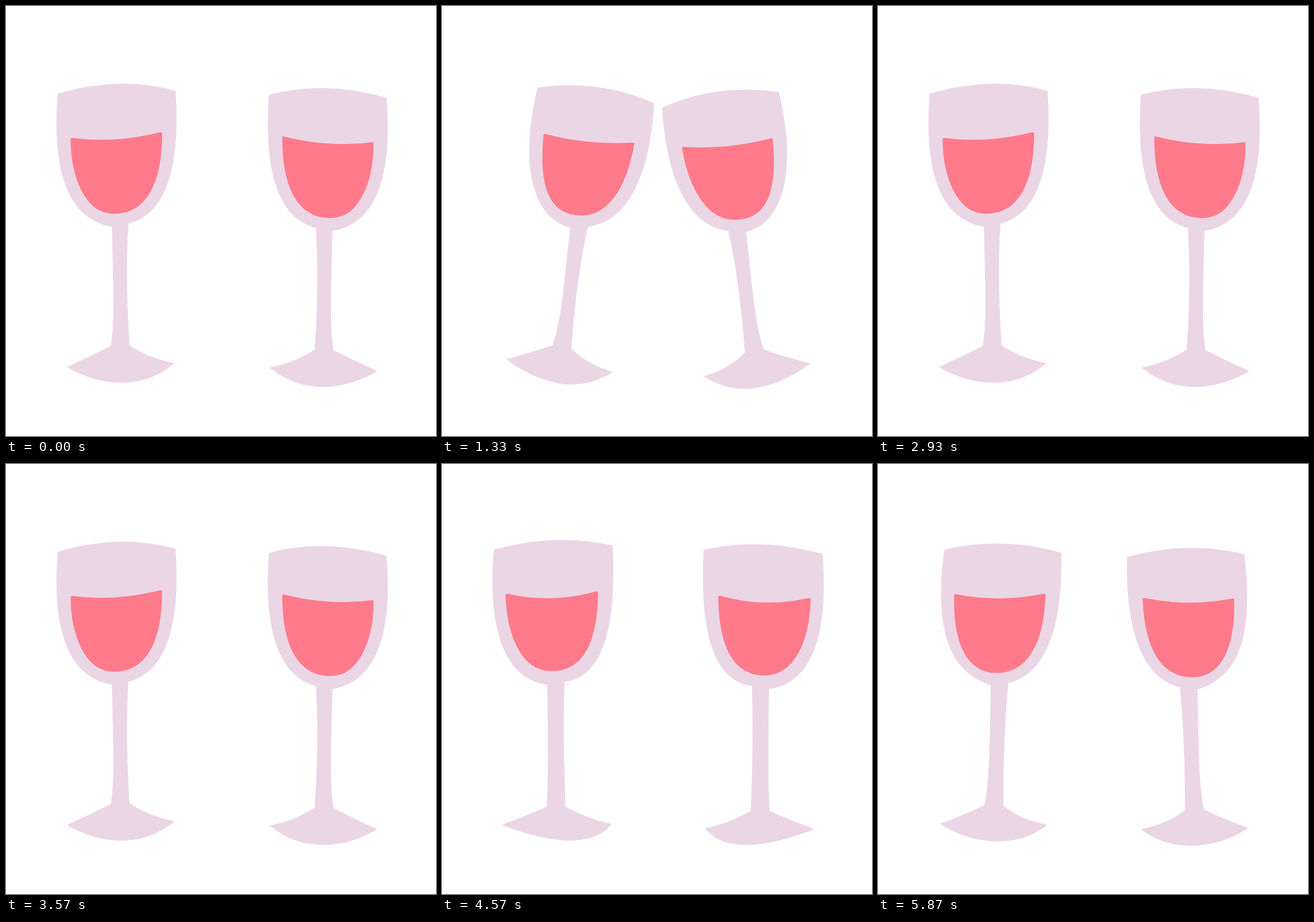
Recreate the animation shown at these times as an HTML page. Size 748 px wide and 748 px high, loop 5.91 s.

```html
<!DOCTYPE html>
<html lang="en">
<head>
<meta charset="utf-8">
<title>Cheers</title>
<style>
  html, body { margin: 0; width: 100%; height: 100%; overflow: hidden; background: #fff; }
  svg { display: block; width: 100vw; height: 100vh; }
  #glass { fill: #ebd6e6; stroke: #ebd6e6; stroke-width: 2; stroke-linejoin: round; }
  #wine { fill: #ff7b8b; stroke: #ff7b8b; stroke-width: 5; stroke-linejoin: round; }
  #spark { fill: none; stroke: #ff7b8b; stroke-width: 6; stroke-linecap: round; }
</style>
</head>
<body>
<svg viewBox="0 0 748 748">
  <defs>
    <g id="left"><path id="glass"/><path id="wine"/></g>
  </defs>
  <use href="#left"/>
  <use href="#left" transform="translate(752 7.5) scale(-1 1)"/>
  <path id="spark" d="M330.500 98.500Q340 119 355.500 137M384 85.500Q378.500 103 378.500 123M427 108.500Q415 126 400.500 139.500"/>
</svg>
<script>
const LOOP = 5910;
const $ = id => document.getElementById(id);

// Left glass in each drawn pose; the right glass is its mirror image.
const poses = {
  upright: {
    glass: 'M91 150Q200 120 296 143C302 270 285 369 212 378Q209 480 214 597Q255 619 293 627C262 663 200 663 107 628Q150 611 183 597C187 540 185 450 184 383C110 374 80 290 91 150Z',
    wine: 'M113 228Q190 246 269 224C268 310 243 358 191 358C136 358 115 290 113 228Z'
  },
  outward: {
    glass: 'M91 153Q198 122 294 148C302 270 283 360 212 378Q206 470 214 591Q250 614 291 622C240 664 170 664 108 628Q150 609 183 592C190 560 188 480 185 383C110 371 80 290 91 153Z',
    wine: 'M115 232Q190 242 269 222C269 310 241 359 188 359C136 359 115 290 115 232Z'
  },
  leaning: {
    glass: 'M116 150Q212 126 318 155C320 260 301 363 226 380Q217 470 217 595Q250 621 293 628C245 665 170 665 110 626Q150 612 186 594C195 555 196 470 197 384C115 359 101 270 116 150Z',
    wine: 'M135 229Q212 244 289 228C286 310 259 361 206 361C151 361 133 300 135 229Z'
  },
  tilted: {
    glass: 'M167 143Q275 128 368 170C361 290 324 375 253 383Q234 465 224 596Q251 624 295 637C243 669 185 665 113 615Q155 604 193 591C210 545 214 470 224 385C146 364 141 250 167 143Z',
    wine: 'M179 225Q255 245 332 240C318 320 284 362 243 362C186 362 171 310 179 225Z'
  }
};

const halfway = (a, b) => {
  const other = b.match(/\d+/g);
  let i = 0;
  return a.replace(/\d+/g, n => (+n + +other[i++]) / 2);
};
poses.closing = {
  glass: halfway(poses.leaning.glass, poses.tilted.glass),
  wine: halfway(poses.leaning.wine, poses.tilted.wine)
};

const states = {
  A: { pose: 'upright' },
  B: { pose: 'outward' },
  C: { pose: 'leaning' },
  E: { pose: 'closing' },
  D: { pose: 'tilted' },
  S: { pose: 'tilted', spark: true },
  T: { pose: 'tilted', spark: true, turn: 'translate(0 2) rotate(1 204 610)' }
};

// Start time in ms and state: A/B wobble, then C E S T D E C for each clink.
const timeline = `
  0B 130A 270B 400A 500B 600A 730B 870A
  1000C 1030E 1070S 1200T 1330D 1370E 1400C
  1470B 1600A 1730B 1870A 2000B 2100A 2200B 2330A
  2500C 2530E 2570S 2700T 2800D 2830E 2870C
  2930B 3100A 3200B 3330A 3470B 3600A 3700B 3800A
  3970C 4000E 4070S 4170T 4300D 4330E 4370C
  4400B 4570A 4700B 4800A 4930B 5070A 5170B 5300A
  5470C 5500E 5530S 5670T 5800D 5830E 5870C
`.trim().split(/\s+/).map(step => ({ start: parseInt(step, 10), state: states[step.slice(-1)] }));

function draw(time) {
  const { state } = timeline.findLast(step => step.start <= time);
  const pose = poses[state.pose];
  $('glass').setAttribute('d', pose.glass);
  $('wine').setAttribute('d', pose.wine);
  $('left').setAttribute('transform', state.turn || '');
  $('spark').setAttribute('visibility', state.spark ? 'visible' : 'hidden');
}

const begin = performance.now();
function tick() {
  draw((performance.now() - begin) % LOOP);
  requestAnimationFrame(tick);
}
tick();
</script>
</body>
</html>
```
